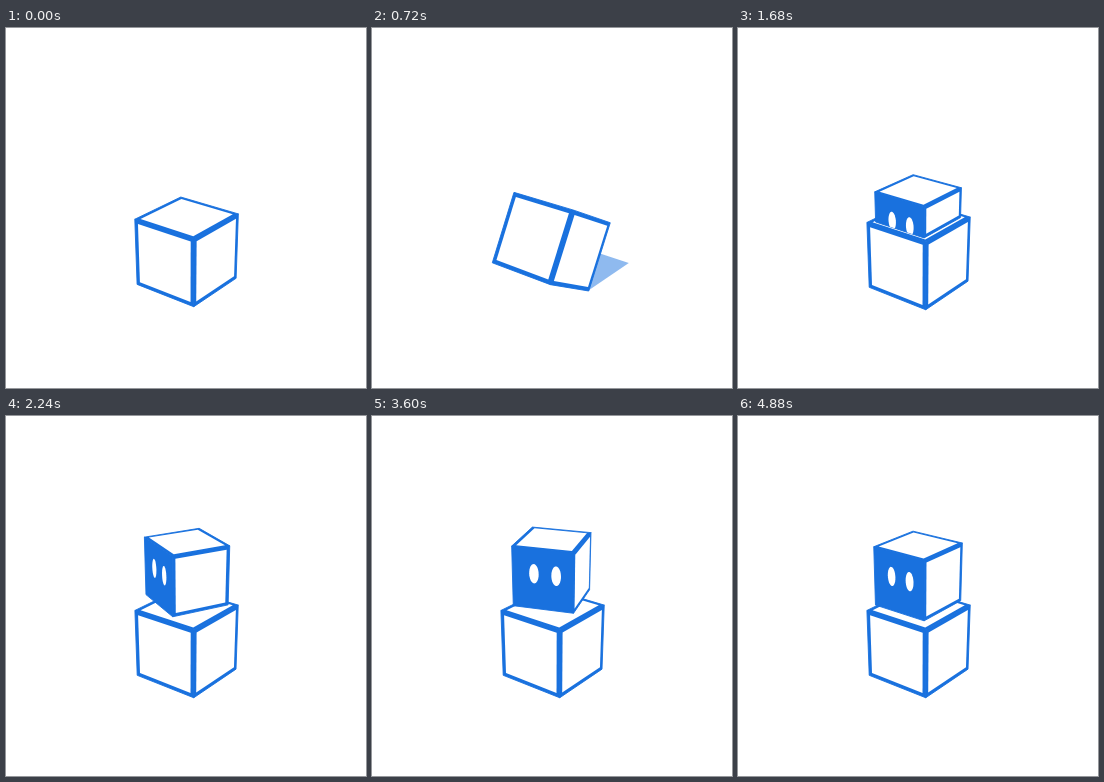
Recreate the animation shown at these times as an HTML page with a canvas. Size 360 by 360 pixels, loop 5 s.

```html
<!DOCTYPE html>
<html lang="en">
<head>
<meta charset="utf-8">
<title>Rolling box</title>
<style>
  html, body { margin: 0; width: 100%; height: 100%; overflow: hidden; background: #fff; }
  canvas { display: block; width: 360px; height: 360px; }
</style>
</head>
<body>
<canvas id="stage"></canvas>
<script>
const LOOP = 5000, STEP = 40, LAST = 4880;
const BLUE = '#1971de', WHITE = '#fff';
const BOX = 36, HEAD = 29.6;            // half sizes
const REST_YAW = -37.7;
const CENTER = { x: 181, y: 224.7 }, DISTANCE = 720;

const canvas = document.getElementById('stage');
const ratio = window.devicePixelRatio || 1;
canvas.width = canvas.height = 360 * ratio;
const ctx = canvas.getContext('2d');

const rad = deg => deg * Math.PI / 180;
const PITCH = { s: Math.sin(rad(26.5)), c: Math.cos(rad(26.5)) };
const mix = (a, b, k) => a + (b - a) * k;
const progress = (t, from, to) => Math.min(1, Math.max(0, (t - from) / (to - from)));
const easeOut = (x, power) => 1 - Math.pow(1 - x, power);

function project([x, y, z]) {
  const depth = z * PITCH.c + y * PITCH.s;
  const k = DISTANCE / (DISTANCE - depth);
  return [CENTER.x + x * k, CENTER.y - (y * PITCH.c - z * PITCH.s) * k];
}

// Maps local points to the screen: roll about x, lift and slide, turn about y, shift sideways.
function placement({ yaw, roll = 0, lift = 0, slide = 0, shift = 0 }) {
  const ys = Math.sin(rad(yaw)), yc = Math.cos(rad(yaw));
  const rs = Math.sin(rad(roll)), rc = Math.cos(rad(roll));
  return ([x, y, z]) => {
    const v = y * rc + z * rs + lift, w = z * rc - y * rs + slide;
    return project([x * yc + w * ys + shift, v, w * yc - x * ys]);
  };
}

function trace(points) {
  ctx.beginPath();
  points.forEach(p => ctx.lineTo(p[0], p[1]));
  ctx.closePath();
}

function fill(points, color) {
  trace(points);
  ctx.fillStyle = color;
  ctx.fill();
}

function isFront([a, b, c]) {
  return (b[0] - a[0]) * (c[1] - a[1]) - (b[1] - a[1]) * (c[0] - a[0]) < 0;
}

// A flat panel from a corner and two edge vectors, with an inner border.
function panel(place, corner, u, v, border, solid) {
  const at = (i, j) => place(corner.map((p, n) => p + u[n] * i + v[n] * j));
  const quad = (i, j) => [at(i, j), at(1 - i, j), at(1 - i, 1 - j), at(i, 1 - j)];
  const outer = quad(0, 0);
  if (!isFront(outer)) return;
  fill(outer, BLUE);
  ctx.stroke();
  const i = border / Math.hypot(...u), j = border / Math.hypot(...v);
  if (!solid && i < 0.5 && j < 0.5) fill(quad(i, j), WHITE);
}

function prism(place, half, low, high, border, solidFront) {
  const d = 2 * half, h = high - low;
  panel(place, [half, low, -half], [-d, 0, 0], [0, h, 0], border);
  panel(place, [-half, low, -half], [0, 0, d], [0, h, 0], border);
  panel(place, [-half, low, -half], [d, 0, 0], [0, 0, d], border);
  panel(place, [-half, high, half], [d, 0, 0], [0, 0, -d], border);
  panel(place, [half, low, half], [0, 0, -d], [0, h, 0], border);
  panel(place, [-half, low, half], [d, 0, 0], [0, h, 0], border, solidFront);
}

// Four quarter rolls in one sweep: speeding up, steady, slowing down.
function rollAngle(t) {
  if (t < 617) return 90 * Math.pow(t / 617, 1.93);
  if (t < 1255) return mix(90, 270, progress(t, 617, 1255));
  return mix(270, 360, easeOut(progress(t, 1255, 1680), 1.33));
}

function drawBox(t) {
  const roll = rollAngle(t) % 90;
  const s = Math.sin(rad(roll)), c = Math.cos(rad(roll));
  const tip = s + c - 1;
  const slide = 4.5 * tip;
  if (roll > 0.01) {
    const near = BOX * (s - c) + slide + 2, far = near - 2.14 * BOX;
    const ground = placement({ yaw: REST_YAW });
    ctx.globalAlpha = s;
    fill([[-BOX, near], [BOX, near], [BOX, far], [-BOX, far]]
      .map(([x, z]) => ground([x, -BOX, z])), BLUE);
    ctx.globalAlpha = 1;
  }
  const drop = 3.4 * (1 - progress(t, 0, 160));
  const lift = 0.92 * BOX * tip + drop;
  prism(placement({ yaw: REST_YAW, roll, lift, slide }), BOX, -BOX, BOX, 3.9);
}

function headYaw(t) {
  if (t < 2700) return mix(REST_YAW, -65, easeOut(progress(t, 1900, 2520), 3));
  if (t < 3400) return mix(-65, -5, easeOut(progress(t, 2680, 3240), 3));
  return mix(-5, REST_YAW, easeOut(progress(t, 3400, 4370), 2));
}

function drawEye(place, x, y) {
  const points = Array.from({ length: 32 }, (_, i) => {
    const a = i * Math.PI / 16;
    return place([x + 0.155 * HEAD * Math.cos(a), y + 0.32 * HEAD * Math.sin(a), HEAD]);
  });
  fill(points, WHITE);
}

function drawHead(t) {
  const rise = easeOut(progress(t, 1600, 1900), 2);
  if (rise === 0) return;
  const gap = 8.6 + 2.2 * easeOut(progress(t, 2680, 3240), 3)
    - 5.6 * easeOut(progress(t, 3600, 4370), 2);
  const bottom = BOX + gap - (1 - rise) * (2 * HEAD + gap);
  const low = Math.max(BOX, bottom), high = bottom + 2 * HEAD;
  const place = placement({ yaw: headYaw(t), shift: -0.6 });
  prism(place, HEAD, low, high, 3.2, true);

  ctx.save();
  trace([[-1, low], [1, low], [1, high], [-1, high]]
    .map(([x, y]) => place([x * HEAD, y, HEAD])));
  ctx.clip();
  const eyeY = bottom + 1.17 * HEAD;
  drawEye(place, -0.29 * HEAD, eyeY);
  drawEye(place, 0.43 * HEAD, eyeY);
  ctx.restore();
}

const start = performance.now();
function frame() {
  const elapsed = (performance.now() - start) % LOOP;
  const t = Math.min(LAST, Math.floor(elapsed / STEP) * STEP);
  ctx.setTransform(ratio, 0, 0, ratio, 0, 0);
  ctx.fillStyle = WHITE;
  ctx.fillRect(0, 0, 360, 360);
  ctx.strokeStyle = BLUE;
  ctx.lineWidth = 0.9;
  ctx.lineJoin = 'round';
  drawBox(t);
  drawHead(t);
  requestAnimationFrame(frame);
}
frame();
</script>
</body>
</html>
```
